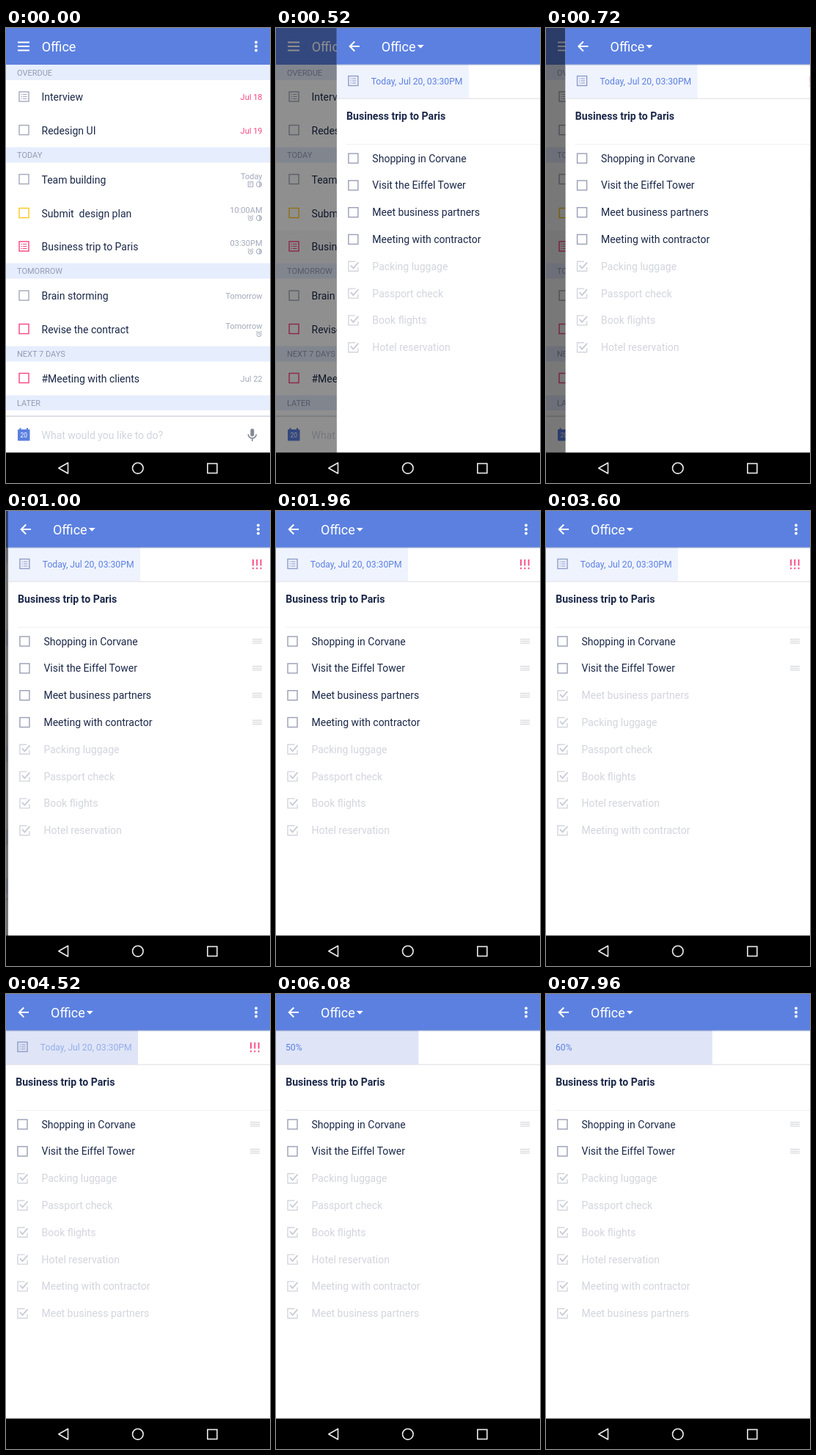
An HTML page that plays this animation: 360 px wide and 620 px high, repeating every 8 s.

```html
<!DOCTYPE html>
<html lang="en">
<head>
<meta charset="utf-8">
<title>To-do list</title>
<style>
  html, body { margin: 0; width: 100%; height: 100%; overflow: hidden; background: #fff; }
  svg { display: block; width: 360px; height: 620px; }
  text { font-family: Roboto, "Noto Sans", sans-serif; font-size: 14px; white-space: pre; }
</style>
</head>
<body>
<svg id="stage" viewBox="0 0 360 620" xmlns="http://www.w3.org/2000/svg"></svg>
<script>
const LOOP = 8000;
const BLUE = '#5b80e0', NAVY = '#1b2848', GREY = '#a3a8bb', PALE = '#d3d5de';
const PINK = '#f9447f', YELLOW = '#fcc722';

const rect = (x, y, w, h, fill, extra = '') =>
  `<rect x="${x}" y="${y}" width="${w}" height="${h}" fill="${fill}" ${extra}/>`;
const line = (d, color, width = 1.5, extra = '') =>
  `<path d="${d}" fill="none" stroke="${color}" stroke-width="${width}" ${extra}/>`;
const label = (x, y, text, fill, size = 14, extra = '') =>
  `<text x="${x}" y="${y}" fill="${fill}" style="font-size:${size}px" ${extra}>${text}</text>`;

const box = (x, y, color, half = 6.5) =>
  rect(x - half, y - half, 2 * half, 2 * half, 'none', `stroke="${color}" stroke-width="1.4"`);

const checkedBox = (x, y) =>
  line(`M${x + 3} ${y - 6.5}H${x - 6.5}V${y + 6.5}H${x + 6.5}V${y + 1}`, PALE, 1.4) +
  line(`M${x - 3.5} ${y - 1.5}L${x} ${y + 2.5}L${x + 7} ${y - 5.5}`, '#c9cbd6', 1.8);

const note = (x, y, color) => box(x, y, color) +
  [-3, 0, 3].map(dy =>
    line(`M${x - 4} ${y + dy}h1.5M${x - 1.5} ${y + dy}h5.5`, color, 1.2)).join('');

const dots = x => [19.5, 25, 30.5].map(y => `<circle cx="${x}" cy="${y}" r="2" fill="#fff"/>`).join('');

// Small status marks under the due time
const clock = (x, y) =>
  `<circle cx="${x}" cy="${y}" r="3.6" fill="none" stroke="${GREY}"/>` +
  `<path d="M${x} ${y - 3.5}a3.5 3.5 0 0 1 0 7z" fill="${GREY}" opacity=".6"/>`;
const alarm = (x, y) =>
  `<circle cx="${x}" cy="${y + .5}" r="3" fill="none" stroke="${GREY}"/>` +
  line(`M${x - 4} ${y - 2.5}l2-1.5M${x + 4} ${y - 2.5}l-2-1.5M${x} ${y - 1.2}v2h1.5`, GREY, 1);
const memo = (x, y) =>
  rect(x - 3.3, y - 3.3, 6.6, 6.6, 'none', `stroke="${GREY}"`) +
  line(`M${x - 1.8} ${y - 1}h3.6M${x - 1.8} ${y + 1}h2.6`, GREY, .8);

function listScreen() {
  const sections = [['OVERDUE', 60.5], ['TODAY', 173], ['TOMORROW', 331], ['NEXT 7 DAYS', 444], ['LATER', 511]];
  const tasks = [
    ['Interview', 94, GREY, 'Jul 18', PINK, note],
    ['Redesign UI', 139.5, GREY, 'Jul 19', PINK, box],
    ['Team building', 206.5, GREY, 'Today', GREY, box, memo, clock],
    ['Submit  design plan', 252.5, YELLOW, '10:00AM', GREY, box, alarm, clock],
    ['Business trip to Paris', 298, PINK, '03:30PM', GREY, note, alarm, clock],
    ['Brain storming', 365, GREY, 'Tomorrow', GREY, box],
    ['Revise the contract', 410.5, PINK, 'Tomorrow', GREY, box, alarm],
    ['#Meeting with clients', 477.5, PINK, 'Jul 22', GREY, box]
  ];
  const heads = sections.map(([name, y]) =>
    rect(0, y - 10.5, 360, 21, '#e6edfd') + label(15, y + 4, name, '#929bb5', 11));
  const rows = tasks.map(([name, y, color, due, dueColor, icon, ...marks]) =>
    icon(24.5, y - .5, color) + label(48.5, y + 5, name, NAVY) +
    label(349.5, y + (marks.length ? -1 : 4), due, dueColor, 11, 'text-anchor="end"') +
    marks.map((mark, i) => mark(345 - 11.5 * (marks.length - 1 - i), y + 6.5)).join(''));
  return rect(0, 0, 360, 579, '#fff') +
    `<g id="press" opacity="0">${rect(0, 276, 360, 44, '#000')}</g>` +
    heads.join('') + rows.join('') +
    rect(0, 0, 360, 50, BLUE) +
    [19.5, 25, 30.5].map(y => line(`M16 ${y}h16`, '#fff', 2)).join('') +
    label(48.7, 31.5, 'Office', '#fff', 18) + dots(341) +
    rect(0, 521, 360, 58, '#fff') + rect(0, 527.5, 360, 1, '#eceef2') + rect(0, 528.5, 360, 1.5, '#d9dce3') +
    rect(16, 547, 16.5, 15.5, BLUE, 'rx="1"') +
    line('M19.5 545v3M29 545v3', BLUE, 2) +
    label(24.2, 557.5, '20', '#fff', 8.5, 'text-anchor="middle"') +
    label(48.5, 559.5, 'What would you like to do?', '#d0d4df') +
    rect(333.3, 546, 5, 10.5, '#848895', 'rx="2.5"') +
    line('M330.3 553.5a5.5 5.5 0 0 0 11 0M335.8 559v4', '#848895', 1.6);
}

// Slots before, between and after the two moves; time of being ticked
const items = [
  { name: 'Shopping in Corvane', slots: [0, 0, 0], done: Infinity },
  { name: 'Visit the Eiffel Tower', slots: [1, 1, 1], done: Infinity },
  { name: 'Packing luggage', slots: [4, 3, 2], done: -1 },
  { name: 'Passport check', slots: [5, 4, 3], done: -1 },
  { name: 'Book flights', slots: [6, 5, 4], done: -1 },
  { name: 'Hotel reservation', slots: [7, 6, 5], done: -1 },
  { name: 'Meeting with contractor', slots: [3, 7, 6], done: 2680 },
  { name: 'Meet business partners', slots: [2, 2, 7], done: 3600 }
];

function itemRow(item, i) {
  const handle = [-2.8, -.2, 2.4].map(y => line(`M333 ${y}h13`, '#d2d3d8', 1.1)).join('');
  return `<g id="item${i}"><g class="open">${box(22.5, 0, '#9a9fb6')}${label(48.5, 5, item.name, NAVY)}${handle}</g>` +
    `<g class="done">${checkedBox(22.5, 0)}${label(48.5, 5, item.name, PALE)}</g></g>`;
}

function detailScreen() {
  const bang = x => line(`M${x} 66v8.5M${x} 77v2.2`, PINK, 1.8);
  return rect(0, 0, 360, 579, '#fff') +
    rect(0, 49, 180, 47, '#eff3fe', 'id="bar"') +
    rect(0, 95.5, 360, 1.5, '#e7e8ec') +
    rect(0, 0, 360, 49, BLUE) +
    rect(0, 49, 360, 1, '#4a68b4', 'opacity=".6"') + rect(0, 50, 360, 1, '#4a68b4', 'opacity=".25"') +
    line('M31 25H18M24.3 18.5L17.8 25l6.5 6.5', '#fff', 2) +
    label(61, 31.5, 'Office', '#fff', 18) +
    '<path d="M109.8 23h9l-4.5 4.7z" fill="#fff"/>' + dots(341) +
    `<g id="icon">${note(22.5, 72, '#8f9cc6')}</g>` +
    label(46.8, 77, 'Today, Jul 20, 03:30PM', BLUE, 12.2, 'id="date"') +
    `<g id="bangs">${bang(334)}${bang(339.3)}${bang(344.6)}</g>` +
    label(13, 77, '50%', BLUE, 12.2, 'id="percent"') +
    label(13.2, 125.3, 'Business trip to Paris', NAVY, 14.1, 'font-weight="700"') +
    rect(13, 158, 347, 1, '#eff0f3') +
    items.map(itemRow).join('');
}

const navBar = () => rect(0, 578.5, 360, 41.5, '#000') +
  line('M84.5 592.5V607L71.8 599.7z', '#ececec', 1.6, 'stroke-linejoin="round"') +
  '<circle cx="179.8" cy="599.8" r="7.3" fill="none" stroke="#ececec" stroke-width="1.6"/>' +
  rect(274.8, 593.5, 13, 13, 'none', 'stroke="#ececec" stroke-width="1.6"');

document.getElementById('stage').innerHTML =
  listScreen() + rect(0, 0, 360, 579, '#000', 'id="scrim"') +
  `<g id="panel">${detailScreen()}</g>` + navBar();

const el = id => document.getElementById(id);
const set = (id, name, value) => el(id).setAttribute(name, value);
const ramp = (t, from, to) => Math.min(1, Math.max(0, (t - from) / (to - from)));
const smooth = u => u * u * (3 - 2 * u);
const mix = (a, b, u) => a + (b - a) * u;

// Moments at which the dragged progress gains one percent
const ticks = [5200, 5500, 5720, 5920, 6080, 6280, 6560, 6780, 7000, 7120, 7360, 7520, 7720, 7960];

function drawItems(t) {
  const first = smooth(ramp(t, 2800, 3380)), second = smooth(ramp(t, 3680, 4260));
  items.forEach(({ slots, done }, i) => {
    const slot = mix(mix(slots[0], slots[1], first), slots[2], second);
    const row = el('item' + i);
    row.setAttribute('transform', `translate(0 ${(177.6 + 36.8 * slot).toFixed(2)})`);
    row.querySelector('.open').style.display = t < done ? '' : 'none';
    row.querySelector('.done').style.display = t < done ? 'none' : '';
  });
}

function drawProgress(t) {
  const press = ramp(t, 4360, 4520), leave = ramp(t, 4520, 4760);
  const shade = [[239, 223], [243, 229], [254, 247]].map(([a, b]) => Math.round(mix(a, b, press)));
  const percent = t < 4880 ? 50 : 49 + ticks.filter(tick => t >= tick).length;
  set('bar', 'fill', `rgb(${shade})`);
  set('bar', 'width', 3.6 * percent);
  set('date', 'opacity', mix(1, .55, press) * (1 - leave));
  set('icon', 'opacity', 1 - leave);
  set('bangs', 'opacity', 1 - leave);
  set('percent', 'opacity', ramp(t, 4680, 4920));
  el('percent').textContent = Math.round(percent / 10) * 10 + '%';
}

function draw(t) {
  const offset = 360 * (1 - ramp(t, 185, 1505)) ** 5;
  set('press', 'opacity', t < 120 ? 0 : .03);
  set('scrim', 'opacity', .57 * (1 - offset / 360));
  set('panel', 'transform', `translate(${offset.toFixed(2)} 0)`);
  drawItems(t);
  drawProgress(t);
}

const start = performance.now();
function frame(now) {
  draw(Math.max(0, now - start) % LOOP);
  requestAnimationFrame(frame);
}
draw(0);
requestAnimationFrame(frame);
</script>
</body>
</html>
```
